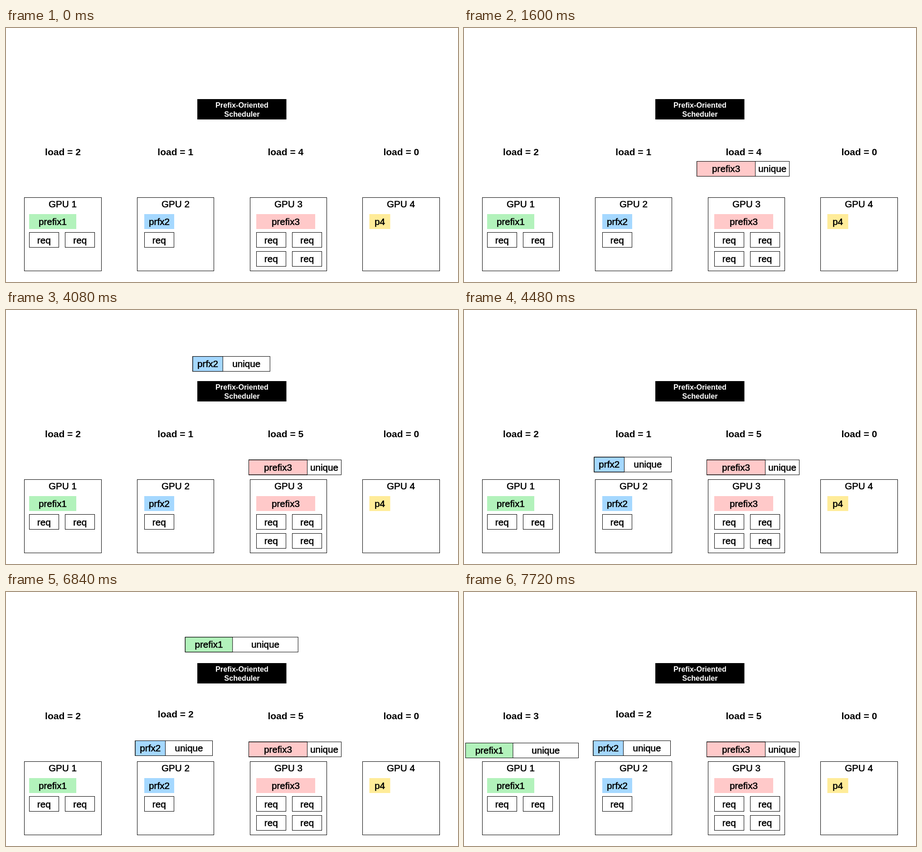
An HTML page with a canvas for the animation above (8 s loop, 997 px wide and 561 px high).

```html
<!DOCTYPE html>
<html lang="en">
<head>
<meta charset="utf-8">
<title>Prefix-Oriented Scheduler</title>
<style>
html, body { margin: 0; width: 100%; height: 100%; overflow: hidden; background: #fff; }
canvas { display: block; }
</style>
</head>
<body>
<canvas id="stage" width="997" height="561"></canvas>
<script>
const ctx = document.getElementById('stage').getContext('2d');
const LOOP = 8000, STEP = 40;
const FAMILY = '"Liberation Sans", Arial, sans-serif';
const GREEN = '#b2f2bb', BLUE = '#a5d8ff', PINK = '#ffc9c9', YELLOW = '#ffec99';

const gpus = [
  { x: 40, w: 170, chip: [51, 104, 'prefix1', GREEN], reqs: 2, reqX: 51,
    load: [125.5, 280.5, 2], change: { at: 7720, load: [125.5, 280.5, 3] } },
  { x: 289, w: 169, chip: [305, 66, 'prfx2', BLUE], reqs: 1, reqX: 305,
    load: [373.7, 280.5, 1], change: { at: 4920, load: [374.2, 277.2, 2] } },
  { x: 538, w: 169, chip: [552, 130, 'prefix3', PINK], reqs: 4, reqX: 552,
    load: [616.8, 280.5, 4], change: { at: 2120, load: [616.8, 280.5, 5] } },
  { x: 786, w: 170, chip: [801.5, 46, 'p4', YELLOW], reqs: 0, reqX: 801,
    load: [871.8, 280.5, 0] }
];

// drop: start, duration, overshoot strength; move: start, end
const bars = [
  { name: 'prefix3', color: PINK, w: 204, split: 129, from: [396.5, 99.5], to: [535.5, 331],
    drop: [32, 364, 1.75], move: [1150, 1758] },
  { name: 'prfx2', color: BLUE, w: 170.5, split: 66.5, from: [413.5, 99.5], to: [285, 328.5],
    drop: [2913, 364, 1.37], move: [4045, 4518] },
  { name: 'prefix1', color: GREEN, w: 249, split: 104.5, from: [395.5, 99.5], to: [3.5, 333.5],
    drop: [5711, 364, 1.6], move: [6832, 7318] }
];

const clamp = v => Math.min(1, Math.max(0, v));
const mix = (a, b, k) => a + (b - a) * k;
const easeInOut = u => (1 - Math.cos(Math.PI * u)) / 2;
const backOut = (u, s) => 1 + (s + 1) * (u - 1) ** 3 + s * (u - 1) ** 2;

function bold(str, x, y, size, color = '#000') {
  ctx.font = `bold ${size}px ${FAMILY}`;
  ctx.fillStyle = color;
  ctx.fillText(str, x, y);
}

// Regular face thickened to a medium weight
function medium(str, x, y) {
  ctx.font = `20.7px ${FAMILY}`;
  ctx.fillStyle = '#000';
  ctx.lineWidth = 0.6;
  ctx.fillText(str, x, y);
  ctx.strokeText(str, x, y);
}

function fill(x, y, w, h, color) {
  ctx.fillStyle = color;
  ctx.fillRect(x, y, w, h);
}

function outline(x, y, w, h) {
  ctx.lineWidth = 1;
  ctx.strokeRect(x, y, w, h);
}

function drawGpu(g, i, t) {
  outline(g.x + 0.5, 374.5, g.w, 162);
  medium('GPU ' + (i + 1), g.x + 85, 396);

  const [x, w, name, color] = g.chip;
  fill(x, 411, w, 33, color);
  medium(name, x + w / 2, 434.5);

  for (let n = 0; n < g.reqs; n++) {
    const rx = g.reqX + (n % 2) * 79.5;
    const ry = 451.5 + (n >> 1) * 41.5;
    outline(Math.floor(rx) + 0.5, Math.floor(ry) + 0.5, 65, 33);
    medium('req', rx + 32.7, ry + 24);
  }

  const [lx, ly, load] = g.change && t >= g.change.at ? g.change.load : g.load;
  bold('load = ' + load, lx, ly, 21);
}

function drawBar(b, t) {
  const [start, span, strength] = b.drop;
  if (t < start) return;
  const drop = backOut(clamp((t - start) / span), strength);
  const go = easeInOut(clamp((t - b.move[0]) / (b.move[1] - b.move[0])));
  const x = mix(b.from[0], b.to[0], go);
  const y = mix(b.from[1], b.to[1], go) - 133 * (1 - drop);

  fill(x, y, b.w, 33, '#fff');
  fill(x, y, b.split, 33, b.color);
  outline(x, y, b.w, 33);
  outline(x, y, b.split, 33);
  medium(b.name, x + b.split / 2, y + 23.5);
  medium('unique', x + (b.split + b.w) / 2, y + 23.5);
}

function draw(t) {
  fill(0, 0, 997, 561, '#fff');
  ctx.strokeStyle = '#000';
  ctx.lineJoin = 'miter';
  ctx.textAlign = 'center';
  ctx.textBaseline = 'alphabetic';

  fill(422, 157, 196.5, 45, '#000');
  bold('Prefix-Oriented', 520.5, 175.7, 16.2, '#fff');
  bold('Scheduler', 520.5, 195.7, 16.2, '#fff');

  gpus.forEach((g, i) => drawGpu(g, i, t));
  bars.forEach(b => drawBar(b, t));
}

function tick() {
  const t = (performance.now() + 1) % LOOP;
  draw(Math.floor(t / STEP) * STEP);
  requestAnimationFrame(tick);
}
tick();
</script>
</body>
</html>
```
